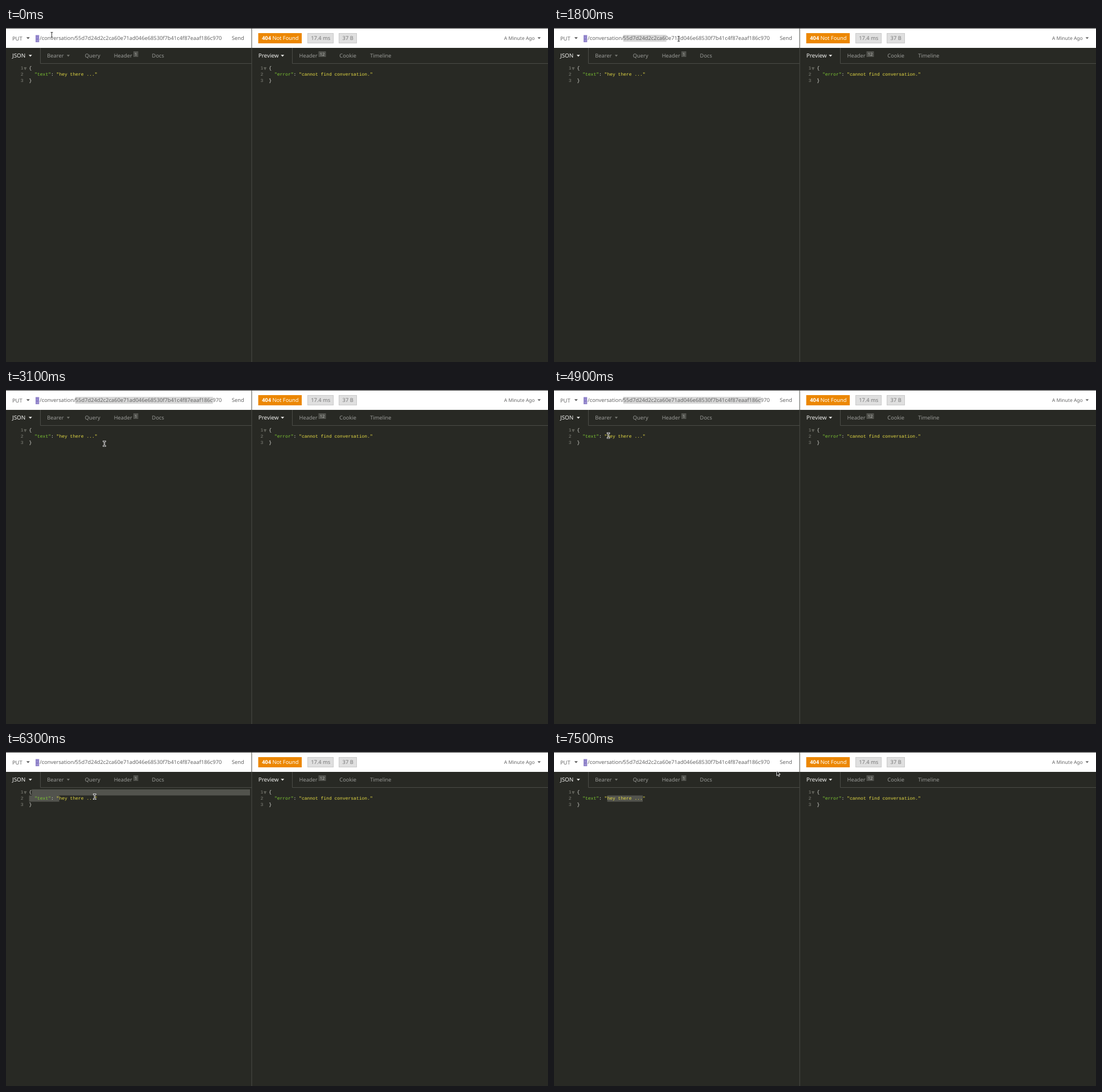
Recreate the animation shown at these times as an HTML page. Size 953 px wide and 588 px high, loop 8 s.

```html
<!DOCTYPE html>
<html lang="en">
<head>
<meta charset="utf-8">
<title>Request client</title>
<style>
  html, body { margin: 0; width: 100%; height: 100%; overflow: hidden; background: #282924; }
  svg { display: block; width: 953px; height: 588px; }
  text { font: 9.3px "Noto Sans", "Open Sans", sans-serif; white-space: pre; text-rendering: geometricPrecision; }
  .bar { fill: #666; }
  .tab { fill: #999a97; }
  .tab.on { fill: #f0f0ee; font-size: 9.9px; font-weight: 500; }
  .count { fill: #b4b4b0; font-size: 7.4px; text-anchor: middle; }
  .code text { font: 8px "Liberation Mono", monospace; fill: #e2e2dc; }
  .code .no { fill: #83847c; text-anchor: end; }
  .key { fill: #7fc934; }
  .str { fill: #e6dc45; }
  .line { stroke: #4b4c47; fill: none; }
  .chip { fill: #dfdfdf; stroke: #c9c9c9; }
</style>
</head>
<body>
<svg viewBox="0 0 953 588">
  <rect width="953" height="588" fill="#282924"/>
  <rect width="953" height="35" fill="#fff"/>
  <path d="M0 .5H953" stroke="#3c3c3c"/>

  <!-- request bar -->
  <rect id="urlSel" x="121.7" y="12" height="12.3" fill="#d8d8d8"/>
  <rect x="52" y="12.5" width="6.3" height="12.5" fill="#8f82c9"/>
  <path d="M53.5 22.5h3.5M54 16.5h1.5" stroke="#b9b0e0" stroke-width=".8"/>
  <g class="bar">
    <text x="11" y="21.6">PUT</text>
    <text x="59.3" y="21.4">/conversation/</text>
    <text x="121.8" y="21.4">55d7d24d2c2ca60e71ad046e68530f7b41c4f87eaaf186c970</text>
    <text x="397" y="21.4" font-size="9.2">Send</text>
    <text x="875.8" y="21" style="font-size:8.5px">A Minute Ago</text>
  </g>

  <!-- response status -->
  <rect x="443.5" y="9" width="76.5" height="18" fill="#ec8702"/>
  <text x="450" y="21.4" fill="#fff"><tspan font-weight="700">404</tspan> Not Found</text>
  <rect class="chip" x="530.5" y="9.5" width="45" height="17"/>
  <rect class="chip" x="585.5" y="9.5" width="31" height="17"/>
  <text x="536.2" y="21.4" fill="#777">17.4 ms</text>
  <text x="591.6" y="21.4" fill="#777">37 B</text>

  <!-- tabs -->
  <path class="line" d="M60.5 35V62.5H432M503.5 35V62.5H953M432 0V588"/>
  <text class="tab on" x="11" y="52.4">JSON</text>
  <text class="tab" x="72.3" y="52.4">Bearer</text>
  <text class="tab" x="138.8" y="52.4">Query</text>
  <text class="tab" x="189.7" y="52">Header</text>
  <text class="tab" x="256.6" y="52.4">Docs</text>
  <text class="tab on" x="443.7" y="52.4">Preview</text>
  <text class="tab" x="515.5" y="52">Header</text>
  <text class="tab" x="586.3" y="52.4">Cookie</text>
  <text class="tab" x="640.3" y="52.4">Timeline</text>
  <path d="M224 41h8.5v10h-8.5zM549.5 41h13v10h-13z" fill="#51524d"/>
  <text class="count" x="228.2" y="48.8">1</text>
  <text class="count" x="556" y="48.8">12</text>
  <g id="carets"></g>

  <!-- code panes -->
  <path id="codeSel" fill="#52534d"/>
  <g class="code" id="body"></g>
  <g class="code" id="reply" transform="translate(421.7)"></g>

  <!-- pointers -->
  <g id="beam" fill="none" stroke-linecap="square">
    <path d="M-1.6-4.2H1.6M0-4.2V4.2M-1.6 4.2H1.6" stroke="#fff" stroke-width="2.3"/>
    <path d="M-1.6-4.2H1.6M0-4.2V4.2M-1.6 4.2H1.6" stroke="#222" stroke-width=".9"/>
  </g>
  <path id="arrow" d="M0 0V8.8L2.1 7L3.5 10.1L5 9.4L3.6 6.4H6.2Z" fill="#111" stroke="#fff" stroke-width=".9"/>
</svg>
<script>
const $ = id => document.getElementById(id);

const caret = (x, y, color, w = 6) =>
  `<path d="M${x} ${y}h${w}l${-w / 2} 3.4z" fill="${color}"/>`;
$('carets').innerHTML =
  caret(35.8, 16.2, '#555') + caret(934.6, 16.2, '#666', 5.6) +
  caret(39.8, 47.2, '#f0f0ee') + caret(483.2, 47.2, '#f0f0ee') +
  caret(106.8, 47.2, '#777872', 5.4);

const listing = (key, value) => `
  <text class="no" x="30.5" y="73.4">1</text>
  <text class="no" x="30.5" y="84.2">2</text>
  <text class="no" x="30.5" y="95.1">3</text>
  <path d="M31.8 69.6h4l-2 4z" fill="#55564f" stroke="#777870" stroke-width=".6"/>
  <text x="40.6" y="73.4">{</text>
  <text x="50.2" y="84.2"><tspan class="key">"${key}"</tspan>: <tspan class="str">"${value}"</tspan></text>
  <text x="40.6" y="95.1">}</text>`;
$('body').innerHTML = listing('text', 'hey there ...');
$('reply').innerHTML = listing('error', 'cannot find conversation.');

// pointer places: time, x, y; smooth until 1500, then held
const approach = [[400, 80.5, 12], [800, 112, 25.5], [1200, 126.5, 19.3], [1300, 127, 19], [1400, 125, 19.3], [1500, 124, 19.3]];
const stops = [[3100, 173, 94.5], [3400, 144, 89.5], [3800, 196.5, 87], [4200, 128.7, 86.7],
  [4500, 101.5, 81.2], [4900, 95.6, 80.2], [5300, 147.6, 75.5], [5600, 153.4, 75.6],
  [5900, 155.4, 77.6], [6300, 155.8, 78.7], [6700, 156.8, 79.5], [7000, 326.2, 74], [7500, 391.6, 33]];

const dragX = t => {
  const u = Math.min(1, Math.max(0, (t - 1600) / 900));
  return 124 + 241 * (1 - (1 - u) ** 2);
};

function pointer(t) {
  if (t >= 3100) return stops.findLast(s => s[0] <= t).slice(1);
  if (t >= 1600) return [dragX(t), 19];
  const i = approach.findLastIndex(s => s[0] <= t);
  if (i < 0) return approach[0].slice(1);
  const a = approach[i], b = approach[i + 1] || a;
  const u = b === a ? 0 : (t - a[0]) / (b[0] - a[0]);
  return [a[1] + (b[1] - a[1]) * u, a[2] + (b[2] - a[2]) * u];
}

function draw(now) {
  const t = Math.floor(now % 8000 / 100) * 100;
  const place = `translate(${pointer(t)})`;
  const isArrow = t >= 7500;
  $('beam').setAttribute('transform', place);
  $('arrow').setAttribute('transform', place);
  $('beam').style.display = isArrow ? 'none' : '';
  $('arrow').style.display = isArrow ? '' : 'none';

  const end = Math.min(363.8, dragX(t - 50));
  $('urlSel').setAttribute('width', t >= 1700 && t < 5300 ? end - 121.7 : 0);
  $('codeSel').setAttribute('d',
    t < 5300 ? '' :
    t < 6700 ? 'M45.4 65.8H429V76.6H93.6V87.4H40.6V76.6H45.4Z' :
    'M93.6 76.6H156V87.4H93.6Z');
}

const start = performance.now();
function tick() {
  draw(performance.now() - start);
  requestAnimationFrame(tick);
}
tick();
</script>
</body>
</html>
```
